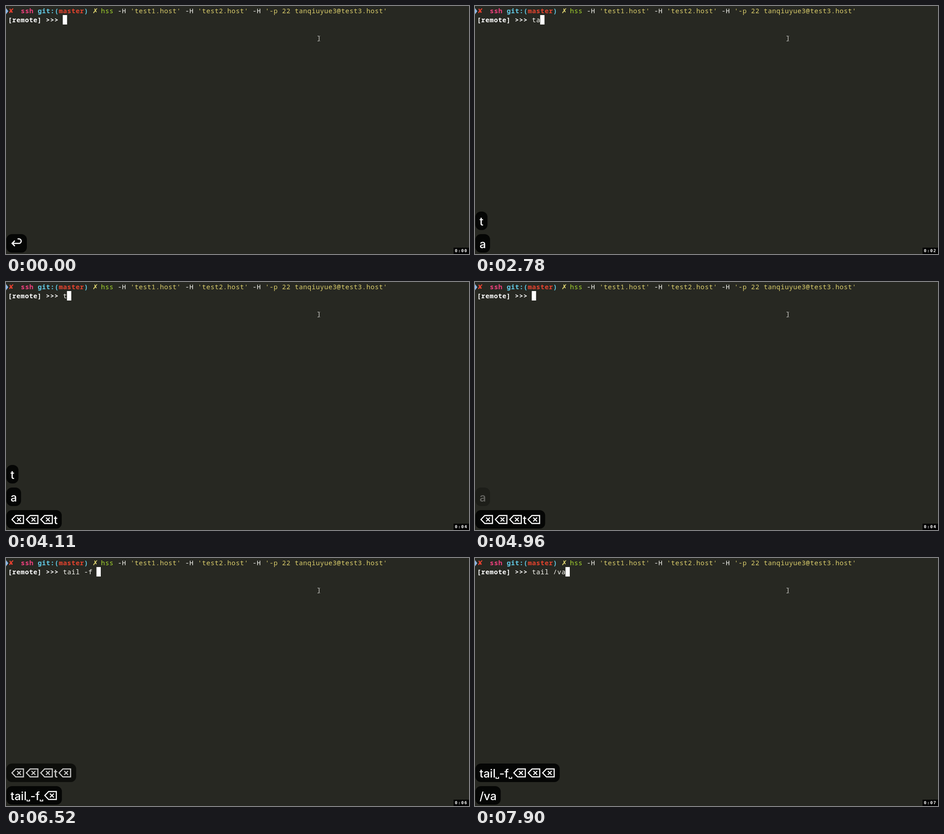
These frames come from a looping animation (1021x549 px, 8 s). An HTML page:

```html
<!DOCTYPE html>
<html lang="en">
<head>
<meta charset="utf-8">
<title>Remote shell session</title>
<style>
  html, body { margin: 0; width: 100%; height: 100%; overflow: hidden; background: #272822; }
  svg { display: block; }
  text { white-space: pre; }
  .term { font: 14.5px "Noto Sans Mono", monospace; letter-spacing: .59px; fill: #f8f8f2; }
  .bold { font-weight: 700; }
  .mark { font: 700 15px "DejaVu Sans", sans-serif; letter-spacing: 0; }
  .key { font: 500 25px Inter, sans-serif; fill: #fff; }
  .icon { fill: none; stroke: #fff; }
  .clock { font: 700 9.5px "DejaVu Sans Mono", monospace; letter-spacing: 1.28px; fill: #fff; }
</style>
</head>
<body>
<svg width="1021" height="549" viewBox="0 0 1021 549">
  <rect width="1021" height="549" fill="#272822"/>
  <path d="M0 4.5L5 11.5L0 18.5Z" fill="#8fb9ea"/>
  <g id="command" class="term"></g>
  <text class="term bold" x="4.5" y="36" style="fill:#fff">[remote] &gt;&gt;&gt; </text>
  <text id="typed" class="term" y="36"></text>
  <rect id="cursor" y="20" width="9.5" height="21" fill="#fff"/>
  <path d="M687 66.5h2q1.5 0 1.5 1.5v8q0 1.5-1.5 1.5h-2M692.5 66.5h-1M692.5 77.5h-1" fill="none" stroke="#dcdcd8" stroke-width="1.2"/>
  <g id="keys"></g>
  <rect x="987" y="535" width="34" height="14"/>
  <text id="clock" class="clock" x="989.8" y="545"></text>
</svg>
<script>
const LOOP = 8000, PITCH = 9.29, LEFT = 5, PROMPT_COLS = 13;
const PAD = 9, ROW_STEP = 50, FADE = 450;
const $ = id => document.getElementById(id);

function add(parent, tag, attrs, content = '') {
  const el = document.createElementNS('http://www.w3.org/2000/svg', tag);
  for (const name in attrs) el.setAttribute(name, attrs[name]);
  el.textContent = content;
  parent.append(el);
  return el;
}
const column = n => LEFT + n * PITCH;

// column, colour, text, class
const command = [
  [0, '#e8412f', '✘', 'mark'],
  [3, '#f0407e', 'ssh', 'bold'],
  [7, '#62cbe6', 'git:(', 'bold'],
  [12, '#e5432e', 'master', 'bold'],
  [18, '#62cbe6', ')', 'bold'],
  [20, '#e6db74', '✗', 'mark'],
  [22, '#a6d92e', 'hss', ''],
  [26, '#f8f8f2', '-H', ''],
  [29, '#dccf6c', "'test1.host'", ''],
  [42, '#f8f8f2', '-H', ''],
  [45, '#dccf6c', "'test2.host'", ''],
  [58, '#f8f8f2', '-H', ''],
  [61, '#dccf6c', "'-p 22 tanqiuyue3@test3.host'", '']
];
for (const [col, fill, text, cls] of command)
  add($('command'), 'text', { x: column(col), y: 16, class: cls, style: `fill:${fill}` }, text);

// Shell echo: time, text after the prompt
const echo = [
  [0, ''], [2220, 't'], [2780, 'ta'], [3410, 't'], [3620, ''], [4110, 't'], [4430, ''],
  [5190, 't'], [5300, 'ta'], [5420, 'tai'], [5650, 'tail'], [5890, 'tail -f'],
  [6230, 'tail -f '], [6640, 'tail -f'], [6760, 'tail -'], [6880, 'tail '],
  [7510, 'tail /'], [7690, 'tail /v'], [7900, 'tail /va']
];

// Key caption rows: start of the fade, then the presses
const rows = [
  { fade: 560, presses: [[0, '↩']] },
  { fade: 4200, presses: [[2220, 't']] },
  { fade: 4640, presses: [[2780, 'a']] },
  { fade: 6410, presses: [[3410, '⌫'], [3500, '⌫'], [3740, '⌫'], [4010, 't'], [4310, '⌫']] },
  { fade: LOOP, presses: [[5080, 't'], [5190, 'a'], [5300, 'i'], [5420, 'l'], [5650, '␣'],
    [5890, '-f'], [6130, '␣'], [6520, '⌫'], [6640, '⌫'], [6760, '⌫']] },
  { fade: LOOP, presses: [[7510, '/'], [7690, 'v'], [7900, 'a']] }
];

const seconds = [1020, 1950, 2990, 4010, 5080, 6130, 7270];
const fadeSteps = [750, 930, 4550, 4840, 4960];
const redraws = [...new Set([
  ...echo.map(e => e[0]), ...rows.flatMap(r => r.presses.map(p => p[0])), ...seconds, ...fadeSteps
])].sort((a, b) => a - b);

const icons = {
  '⌫': { advance: 31.8, weight: 2.4, d: 'M3.2 20.7L11.5 12H28.5V29.5H11.5ZM14.5 16.5l8.5 8.5M23 16.5l-8.5 8.5' },
  '↩': { advance: 27, weight: 2.6, d: 'M15.5 10.5h3a5 5 0 0 1 0 10H4M9.5 14.5l-6 6l6 6' },
  '␣': { advance: 8, weight: 1.9, d: 'M1 29.5v3.4h5.6v-3.4' }
};
const ruler = document.createElement('canvas').getContext('2d');
ruler.font = '500 25px Inter, sans-serif';

function drawRow(caption, slot, opacity) {
  const g = add($('keys'), 'g', { transform: `translate(1 ${505 - slot * ROW_STEP})`, opacity });
  const box = add(g, 'rect', { height: 41, rx: 12, 'fill-opacity': .86 });
  let x = PAD;
  for (const part of caption.match(/[⌫↩␣]|[^⌫↩␣]+/g)) {
    const icon = icons[part];
    if (icon) {
      add(g, 'path', { class: 'icon', d: icon.d, 'stroke-width': icon.weight, transform: `translate(${x} 0)` });
      x += icon.advance;
    } else {
      add(g, 'text', { class: 'key', x, y: 30.5 }, part);
      x += ruler.measureText(part).width;
    }
  }
  box.setAttribute('width', x + PAD);
}

function draw(t) {
  const text = echo.findLast(e => e[0] <= t)[1];
  const end = column(PROMPT_COLS);
  $('typed').setAttribute('x', end);
  $('typed').textContent = text;
  $('cursor').setAttribute('x', end + text.length * PITCH - .6);
  $('clock').textContent = '0:0' + seconds.filter(s => s <= t).length;

  $('keys').replaceChildren();
  const shown = rows.filter(r => r.presses[0][0] <= t).reverse();
  shown.forEach((row, slot) => {
    const opacity = Math.min(1, 1 - (t - row.fade) / FADE);
    if (opacity <= 0) return;
    drawRow(row.presses.filter(p => p[0] <= t).map(p => p[1]).join(''), slot, opacity);
  });
}

let drawn = -1;
const start = performance.now();
function tick() {
  const t = (performance.now() - start) % LOOP;
  const step = redraws.findLast(r => r <= t);
  if (step !== drawn) draw(drawn = step);
  requestAnimationFrame(tick);
}
tick();
</script>
</body>
</html>
```
